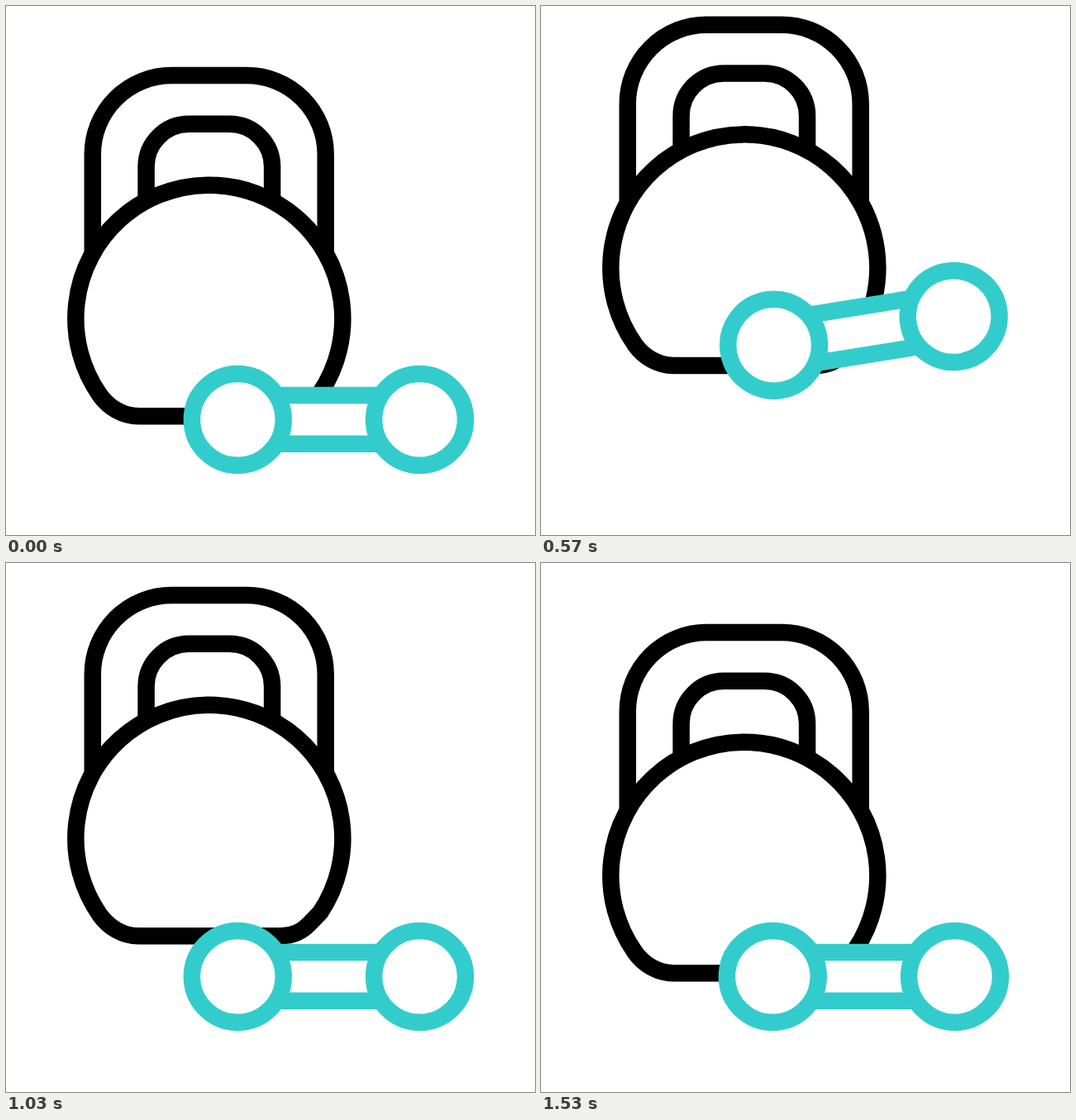
Animation, 640 px wide and 640 px high, one loop 1.67 s. Source, as an HTML page:

```html
<!DOCTYPE html>
<html lang="en">
<head>
<meta charset="utf-8">
<title>Kettlebell and dumbbell</title>
<style>
  html, body { margin: 0; width: 100%; height: 100%; overflow: hidden; background: #fff; }
  svg { display: block; width: 100vw; height: 100vh; }
  g { stroke-width: 20.5; }
</style>
</head>
<body>
<svg viewBox="0 0 640 640">
  <g id="bell" fill="none" stroke="#000">
    <path d="M104.8 297V179.5A95.5 95.5 0 0 1 200.3 84H291.2A95.5 95.5 0 0 1 386.7 179.5V297"/>
    <path d="M169.6 232V194.3A51.5 51.5 0 0 1 221.1 142.8H270.6A51.5 51.5 0 0 1 322.1 194.3V232"/>
    <path d="M113.7 471A161.5 161.5 0 1 1 380.4 467.5L367 481.5C358 491 347 496.2 333 496.2H160.5C141 496.2 124 485.5 113.7 471Z"/>
  </g>
  <g id="dumb" fill="#fff" stroke="#33cccc">
    <path d="M-110-29.4H110V29.4H-110Z"/>
    <circle cx="-110.1" r="55.4"/>
    <circle cx="110.1" r="55.4"/>
  </g>
</svg>
<script>
const LOOP = 1670, FPS = 30, LAST = 46;
const bell = document.getElementById("bell");
const dumb = document.getElementById("dumb");

// Keys are [frame, value]
const bellY = [[0, 0], [16.9, -61.3], [17, -61.3], [22.9, -3.2], [35.7, -61.3], [46, 0]];
const dumbY = [[10, 0], [21, -148.4], [30, 0]];
const dumbTurn = [[14.6, 0], [29.8, -180]];

// Cubic ease-in-out with handles at .42 and .58
function ease(u) {
  let lo = 0, hi = 1;
  for (let i = 0; i < 24; i++) {
    const s = (lo + hi) / 2, r = 1 - s;
    const x = 1.26 * s * r * r + 1.74 * s * s * r + s * s * s;
    if (x < u) lo = s; else hi = s;
  }
  return lo * lo * (3 - 2 * lo);
}

function valueAt(keys, f) {
  if (f <= keys[0][0]) return keys[0][1];
  for (let i = 1; i < keys.length; i++) {
    const [a, from] = keys[i - 1], [b, to] = keys[i];
    if (f < b) return from + (to - from) * ease((f - a) / (b - a));
  }
  return keys[keys.length - 1][1];
}

function draw(ms) {
  const f = Math.min(LAST, Math.floor((ms + 3.5) * FPS / 1000));
  bell.setAttribute("transform", `translate(0 ${valueAt(bellY, f)})`);
  dumb.setAttribute("transform",
    `translate(390.4 ${500.4 + valueAt(dumbY, f)}) rotate(${valueAt(dumbTurn, f)})`);
}

const start = performance.now();
function tick() {
  draw((performance.now() - start) % LOOP);
  requestAnimationFrame(tick);
}
tick();
</script>
</body>
</html>
```
